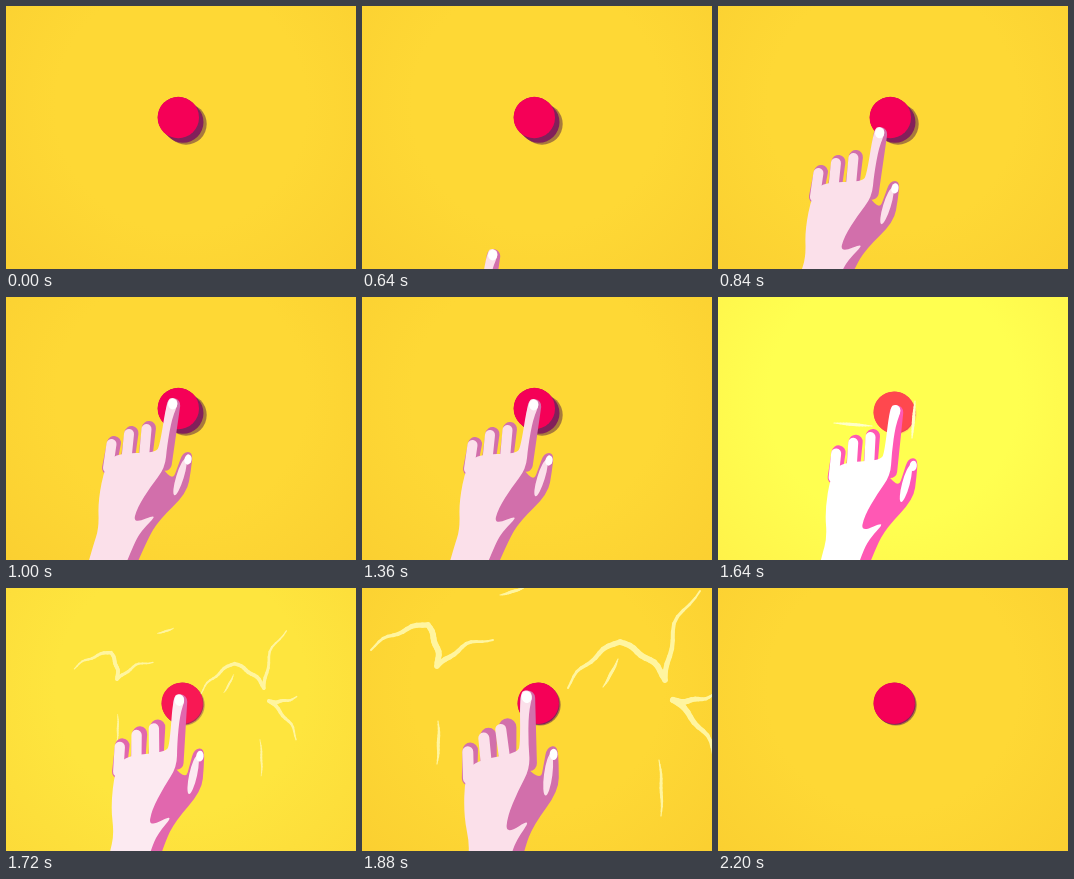
An HTML page with a canvas for the animation above (3360 ms loop, 350 px wide and 263 px high).

```html
<!DOCTYPE html>
<html lang="en">
<head>
<meta charset="utf-8">
<title>Red button</title>
<style>
html, body { margin: 0; width: 100%; height: 100%; overflow: hidden; background: #fdd835; }
canvas { display: block; width: 100vw; height: 100vh; }
</style>
</head>
<body>
<canvas id="stage" width="350" height="263"></canvas>
<script>
const ctx = document.getElementById('stage').getContext('2d');
const LOOP = 3360, STEP = 40;

const lerp = (a, b, u) => a + (b - a) * u;
const ramp = (t, from, to) => Math.min(1, Math.max(0, (t - from) / (to - from)));
const easeOut = u => 1 - (1 - u) ** 2;
const easeIn = u => u ** 2;
const parse = s => s.split(' ').map(p => p.split(',').map(Number));
const mix = (a, b, u) => `rgb(${a.map((v, i) => Math.round(lerp(v, b[i], u)))})`;

// Key points of the two hand silhouettes and corners of the lightning
const palmShade = parse('150,155 171,186 177,170 182,156 192,156 190,174 186,197 158,224 146,244 118,310 95,310 130,240 120,180');
const palmLight = parse('78,300 92,250 98,232 97,205 104,170 115,157 155,157 159,148 166,104 172,101 178,106 171,122 166,150 164,172 150,190 136,212 132,228 158,217 140,235 132,250 108,310');
const bolts = [
  '9,62 66,37 75,78 131,52', '206,100 258,54 303,92 338,3', '354,105 311,112 353,172'
].map(parse);
const streaks = ['76,133 75,176', '256,71 241,99', '297,172 299,228', '163,-1 138,7'].map(parse);
const sparks = ['116,126 154,129', '197,104 194,141'].map(parse);

function ellipse(x, y, rx, ry, color, turn = 0) {
  ctx.fillStyle = color;
  ctx.beginPath();
  ctx.ellipse(x, y, rx, ry, turn, 0, Math.PI * 2);
  ctx.fill();
}

function capsule(x1, y1, x2, y2, width, color) {
  ctx.strokeStyle = color;
  ctx.lineWidth = width;
  ctx.lineCap = 'round';
  ctx.beginPath();
  ctx.moveTo(x1, y1);
  ctx.lineTo(x2, y2);
  ctx.stroke();
}

function blob(pts, color) {
  const middle = (a, b) => [(a[0] + b[0]) / 2, (a[1] + b[1]) / 2];
  ctx.beginPath();
  ctx.moveTo(...middle(pts[pts.length - 1], pts[0]));
  pts.forEach((p, i) => ctx.quadraticCurveTo(...p, ...middle(p, pts[(i + 1) % pts.length])));
  ctx.fillStyle = color;
  ctx.fill();
}

// Bowed, slightly wavy line through its corners, thin at both ends
function brush(corners, width, bow, color) {
  const parts = 12, last = (corners.length - 1) * parts;
  const at = n => {
    const i = Math.min(Math.floor(n / parts), corners.length - 2), u = n / parts - i;
    const [ax, ay] = corners[i], [bx, by] = corners[i + 1];
    const bend = bow * Math.sin(Math.PI * u) * (1 + .4 * Math.sin(9 * u + i));
    return [lerp(ax, bx, u) + (by - ay) * bend, lerp(ay, by, u) - (bx - ax) * bend];
  };
  for (let n = 0; n < last; n++) {
    const swell = .3 + .7 * Math.sin(Math.PI * (n + .5) / last);
    capsule(...at(n), ...at(n + 1), width * swell, color);
  }
}

function drawBackground(flash) {
  const g = ctx.createRadialGradient(175, 100, 125, 175, 100, 260);
  g.addColorStop(0, mix([254, 216, 53], [255, 255, 80], flash));
  g.addColorStop(1, mix([250, 206, 48], [255, 240, 72], flash));
  ctx.fillStyle = g;
  ctx.fillRect(0, 0, 350, 263);
}

function drawButton(press, flash) {
  const x = lerp(172.3, 176.2, press), y = lerp(111.5, 115.2, press);
  ellipse(lerp(180, 178, press), lerp(118, 116.8, press), 20.7, 20.7,
    mix([168, 122, 60], [255, 225, 90], flash));
  capsule(x, y, 177, 116.2, 41, mix([130, 32, 90], [240, 65, 85], flash));
  ellipse(x, y, 20.7, 20.7, mix([245, 0, 87], [255, 72, 78], flash));
}

function drawBolts(t) {
  if (t < 1640) return;
  if (t < 1680) {
    sparks.forEach(s => brush(s, 3, 0, '#ffffc8'));
    return;
  }
  const fade = 1 - ramp(t, 1880, 2160);
  if (!fade) return;
  const scale = lerp(.2, 1, easeOut(ramp(t, 1640, 1880))) + .3 * ramp(t, 1880, 2160);
  ctx.save();
  ctx.translate(176, 115);
  ctx.scale(scale, scale);
  ctx.translate(-176, -115);
  bolts.forEach(b => brush(b, 6 * fade, .1, '#fff5a0'));
  streaks.forEach(s => brush(s, 3 * fade, .03, '#fff5a0'));
  ctx.restore();
}

function drawFingers(curl, shade, light) {
  for (let k = 0; k < 3; k++) {
    const x = 112 + 17.5 * k, y = 147 - 12.5 * k + 2.5 * k * k;
    capsule(x + 1 + curl * k, y, x - 4, 172, 14 + curl * k, shade);
    capsule(x - 1.5 - curl * k, y + 1, x - 5, 172, 10, light);
  }
}

function drawHand(t, press, flash) {
  if (t < 640 || t >= 2200) return;
  const away = 1 - easeOut(ramp(t, 640, 960));
  const hover = 1 - ramp(t, 1000, 1360);
  const recoil = ramp(t, 1640, 1880);
  const leave = easeIn(ramp(t, 1880, 2180));
  const shade = mix([210, 111, 171], [255, 88, 180], flash);
  const light = mix([251, 224, 234], [255, 255, 255], flash);

  ctx.save();
  ctx.translate(172 - 36 * away - 5 * hover + 6 * press - 13 * recoil - 25 * leave,
    108 + 142 * away - hover + 6 * press - 5 * recoil + 190 * leave);
  ctx.rotate(-.04 * press - .13 * recoil);
  ctx.scale(1 + .1 * recoil, 1 + .1 * recoil);
  ctx.translate(-172, -108);

  capsule(172.5, 109, 164, 168, 13.5, shade);
  blob(palmShade, shade);
  drawFingers(recoil, shade, light);
  blob(palmLight, light);
  ellipse(179, 181, 3.8, 19, light, .3);
  ellipse(171.7, 108, 4.6, 5.4, '#fff');
  ellipse(187, 163.5, 3.6, 5.2, '#fff', .2);
  ctx.restore();
}

function draw(t) {
  const press = ramp(t, 1480, 1600);
  const flash = ramp(t, 1560, 1640) * (1 - ramp(t, 1640, 1760));
  drawBackground(flash);
  drawButton(press, flash);
  drawBolts(t);
  drawHand(t, press, flash);
}

const start = performance.now();
function tick() {
  const t = (performance.now() - start) % LOOP;
  draw(Math.floor(t / STEP) * STEP);
  requestAnimationFrame(tick);
}
tick();
</script>
</body>
</html>
```
